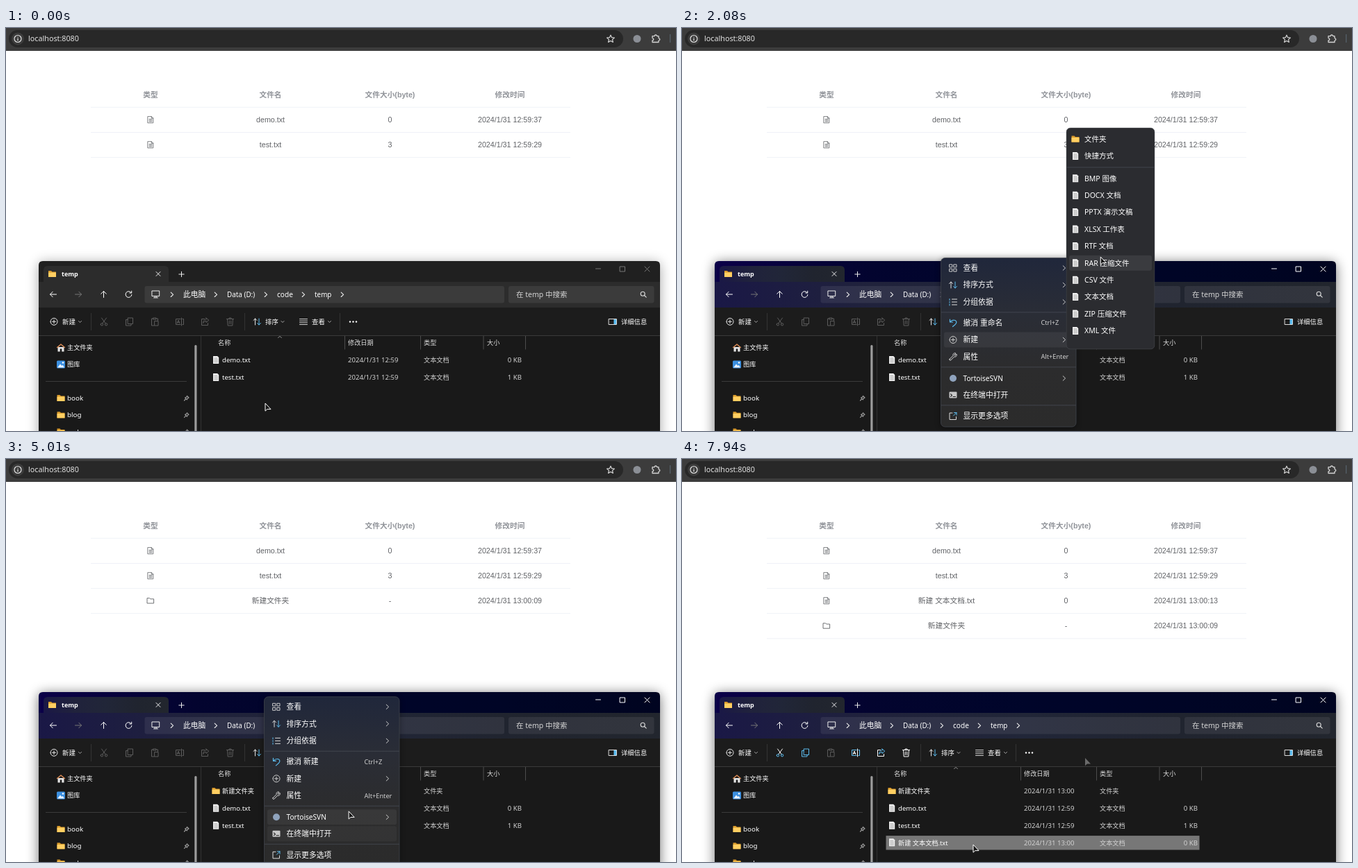
Recreate the animation shown at these times as an HTML page. Size 964 by 581 pixels, loop 8000 ms.

```html
<!DOCTYPE html>
<html lang="zh-CN">
<head>
<meta charset="utf-8">
<title>File list</title>
<style>
html,body{margin:0;width:100%;height:100%;overflow:hidden;background:#fff}
svg{display:block;width:964px;height:581px}
text{white-space:pre;font-family:"Noto Sans","Noto Sans CJK SC",sans-serif}
.web text{font-family:"Liberation Sans","Noto Sans CJK SC",sans-serif}
.tool{color:#fff;--a:#5cbdf0}
.tool.off{color:#5c5c5c;--a:#5c5c5c}
</style>
</head>
<body>
<svg id="stage" viewBox="0 0 964 581"></svg>
<script>
const LOOP = 8000;
const BLUE = '#5cbdf0';

// ---------- markup helpers ----------
const text = (x, y, s, size, fill = '#fff', anchor = 'start', weight = 400) =>
  `<text x="${x}" y="${y + size * .36}" font-size="${size}" fill="${fill}" text-anchor="${anchor}" font-weight="${weight}">${s}</text>`;
const rect = (x, y, w, h, fill, r = 0, more = '') =>
  `<rect x="${x}" y="${y}" width="${w}" height="${h}" rx="${r}" fill="${fill}" ${more}/>`;
const line = (x, y, d, color, w = 1) =>
  `<path transform="translate(${x} ${y})" d="${d}" fill="none" stroke="${color}" stroke-width="${w}" stroke-linecap="round" stroke-linejoin="round"/>`;
const solid = (x, y, d, fill) => `<path transform="translate(${x} ${y})" d="${d}" fill="${fill}"/>`;
const group = (id, body, more = '') => `<g id="${id}" ${more}>${body}</g>`;
const size = s => /[\u4e00-\u9fff]/.test(s) ? 9.2 : 9.6;
const label = (x, y, s, fill, anchor) => text(x, y, s, size(s), fill, anchor);

const RIGHT = 'M-1.8-3.2L1.6 0L-1.8 3.2';
const DOWN = 'M-2-1L0 1L2-1';
const RING = 'M-5 0a5 5 0 1 0 10 0a5 5 0 1 0-10 0';
const PLUS = 'M-2.5 0H2.5M0-2.5V2.5';

const folder = (x, y) =>
  solid(x, y, 'M-5.5-4.5H-1.5L0-3H5.5V4.5H-5.5Z', '#d99a2b') +
  solid(x, y, 'M-5.5-2H5.5V4.5H-5.5Z', '#ffcf62');
const sheet = (x, y) =>
  solid(x, y, 'M-4-5.5H2.2L4.2-3.5V5.5H-4Z', '#f1f1f1') +
  line(x, y, 'M-2.4-2.6H2M-2.4-.6H2.6M-2.4 1.4H2.6M-2.4 3.4H2.6', '#9a9a9a', .8);

// ---------- browser ----------
function browser() {
  return rect(0, 0, 964, 33, '#3c3c3c') + rect(4, 3, 884, 25, '#282828', 12.5) +
    `<circle cx="17" cy="15.5" r="9" fill="#3c3c3c"/>` +
    line(17, 15.5, RING, '#e3e3e3', 1.2) + line(17, 15.5, 'M0-.4V2.4M0-2.5V-2.4', '#e3e3e3', 1.2) +
    text(32, 15.5, 'localhost:8080', 10.75, '#e3e3e3') +
    line(870, 15.5, 'M0-5.3L1.6-1.8L5.4-1.4L2.5 1.1L3.4 4.9L0 2.9L-3.4 4.9L-2.5 1.1L-5.4-1.4L-1.6-1.8Z', '#d5d5d5', 1.2) +
    `<circle cx="908" cy="15.5" r="5.5" fill="#8b8f96"/>` +
    line(935, 15.5, 'M-5-3.8H-1.8a1.7 1.7 0 0 1 3.4 0H4V-.8a1.7 1.7 0 0 1 0 3.4V5H-5V2.5a1.7 1.7 0 0 0 0-3.4Z', '#d5d5d5', 1.3) +
    rect(955, 9, 1.2, 12, '#56616b');
}

// ---------- page table ----------
const COLS = [208, 380.5, 552.5, 725];
function webRow(id, y, name, bytes, time) {
  const icon = bytes === '-'
    ? line(208, y, 'M-4.6-3.7H-1.4L-.2-2.5H4.6V3.7H-4.6Z', '#606266', .9)
    : line(208, y, 'M-3.8-4.6H1.3L3.8-2.1V4.6H-3.8ZM1.3-4.6V-2.1H3.8M-2-.8H2M-2 .9H2M-2 2.6H2', '#606266', .8);
  return group(id, rect(122, y - 17.5, 690, 35.5, '#f9fafc', 0, `id="${id}Hover" visibility="hidden"`) + icon +
    [name, bytes, time].map((s, i) => text(COLS[i + 1], y, s, 10.7, '#606266', 'middle')).join('') +
    rect(122, y + 18, 690, .8, '#ebeef5'));
}
function table() {
  return ['类型', '文件名', '文件大小(byte)', '修改时间'].map((s, i) =>
    text(COLS[i], 96, s, 10.7, '#909399', 'middle', 700)).join('') + rect(122, 113.8, 690, .8, '#ebeef5') +
    webRow('w1', 132.2, 'demo.txt', '0', '2024/1/31 12:59:37') +
    webRow('w2', 168.3, 'test.txt', '3', '2024/1/31 12:59:29') +
    webRow('w3', 204.3, '新建 文本文档.txt', '0', '2024/1/31 13:00:13') +
    webRow('w4', 204.3, '新建文件夹', '-', '2024/1/31 13:00:09');
}

// ---------- explorer ----------
const C = 'currentColor', A = 'var(--a)';
const TOOLS = {
  cut: line(141, 423.5, 'M-3.5-5.5L2.2 2.2M3.5-5.5L-2.2 2.2', C) +
    line(141, 423.5, 'M-4.8 3.8a1.7 1.7 0 1 0 3.4 0a1.7 1.7 0 1 0-3.4 0M1.4 3.8a1.7 1.7 0 1 0 3.4 0a1.7 1.7 0 1 0-3.4 0', A),
  copy: line(177.5, 423.5, 'M-2-5.5H5V3H-2ZM-2-3H-5V5.5H2.5V3', A),
  paste: line(214, 423.5, 'M-2-4.5H-4.5V5.5H-1M2-4.5H4.5V-2M-2-5.5H2V-3.5H-2ZM0-1H5V5.5H0Z', C),
  rename: line(250, 423.5, 'M1-4H-5.5V4H1M4-4H5.5V4H4', A) +
    line(250, 423.5, 'M2.5-5.5V5.5M-3.8 2.2L-2-2.4L-.2 2.2M-3.2.8H-.8', C),
  share: line(286.5, 423.5, 'M-1-4H-5V5H4V2', C) + line(286.5, 423.5, 'M1.5-5.5L5.3-2.3L1.5 1V-1C-1-1-2 .5-2.8 2C-2.5-2-.5-3.5 1.5-3.7Z', A),
  trash: line(322.5, 423.5, 'M-5-4H5M-1.5-4V-5.5H1.5V-4M-4-4L-3.3 5.5H3.3L4-4M-1.2-1.5V3M1.2-1.5V3', C)
};
function explorerRow(id, y, icon, name, date, type, kb) {
  return group(id, rect(293.5, y - 10.2, 451, 20.4, 'none', 0, `id="${id}Box"`) + icon(302, y - .5) +
    label(311, y, name) + label(492, y, date, '#d2d2d2') + label(601, y, type, '#d2d2d2') + label(742, y, kb, '#d2d2d2', 'end'));
}
function editBox(id, y, w, sel, head, tail) {
  return group(id, rect(309.5, y - 7, w, 14.5, '#191919', 0, 'stroke="#e8e8e8" stroke-width="1"') +
    rect(311, y - 5.8, sel, 12, '#0f78d4') + label(311, y, head) + (tail ? text(311 + sel, y, tail, 9.2) : ''));
}
function windowFrame() {
  const tab = 'M54 366V349q0-6 6-6H228q6 0 6 6V366Z';
  const top = 'M47 366V342q0-6 6-6H935q6 0 6 6V366Z';
  const skin = (bar, band) => `<path d="${top}" fill="${bar}"/>` + rect(47, 366, 894, 37, band) + `<path d="${tab}" fill="${band}"/>`;
  const controls = color => line(852, 347, 'M-3.5 0H3.5', color) + line(887, 347.5, 'M-3.5-3.5H3.5V3.5H-3.5Z', color) +
    line(922.5, 347.5, 'M-3.5-3.5L3.5 3.5M3.5-3.5L-3.5 3.5', color);
  return rect(47, 338, 894, 260, '#000', 6, 'id="shadow" filter="url(#blur)"') +
    rect(47, 342, 894, 245, '#191919') +
    group('idle', skin('#202020', '#2c2c2c') + controls('#777')) +
    group('live', skin('url(#bar)', 'url(#band)') + controls('#fff')) +
    rect(199.5, 372, 517.5, 24.5, '#fff', 3, 'opacity=".07"') + rect(723, 372, 209.5, 24.5, '#fff', 3, 'opacity=".07"') +
    folder(66.5, 354.5) + text(80, 354.5, 'temp', 9, '#fff', 'start', 600) +
    line(219, 354.5, 'M-3-3L3 3M3-3L-3 3', '#eee') + line(252.5, 355, 'M-3.7 0H3.7M0-3.7V3.7', '#eee');
}
function navigation() {
  return line(68, 384, 'M4.5 0H-4.5M-.8-3.8L-4.5 0L-.8 3.8', '#fff') + line(104, 384, 'M-4.5 0H4.5M.8-3.8L4.5 0L.8 3.8', '#777') +
    line(140.5, 384, 'M0 4.5V-4.5M-3.8-.8L0-4.5L3.8-.8', '#fff') +
    line(176.5, 384, 'M3.8-2.2A4.4 4.4 0 1 0 4.4.5M4.2-4.8V-2H1.4', '#fff') +
    line(215.5, 383.5, 'M-5.2-4.5H5.2V3H-5.2ZM-1.2 3V5.2M1.2 3V5.2M-3 5.4H3', '#eee') +
    [239, 302, 374, 428, 484].map(x => line(x, 384.3, RIGHT, '#eee', 1.1)).join('') +
    text(255, 384, '此电脑', 10.8) + text(318, 384, 'Data (D:)', 9.9) + text(390, 384, 'code', 10.1) + text(444, 384.3, 'temp', 9.9) +
    text(734, 384.3, '在 temp 中搜索', 10.5, '#d4d4d4') +
    line(917, 384, 'M-3.8-.8a3 3 0 1 0 6 0a3 3 0 1 0-6 0M1.5 1.5L4.2 4.2', '#ddd', 1.1);
}
function commands() {
  return rect(47, 403, 894, 40, '#1c1c1c') + rect(47, 443, 894, 1, '#3a3a3a') +
    [122, 343, 480].map(x => rect(x, 411, .8, 25, '#3a3a3a')).join('') +
    line(69, 423.3, RING + PLUS, '#e8e8e8') + text(81, 423.5, '新建', 9.5) + line(106.5, 423.5, DOWN, '#aaa') +
    Object.keys(TOOLS).map(k => group(k, TOOLS[k], 'class="tool off"')).join('') +
    line(361, 423.5, 'M-2.5 4.5V-4.5M-5-2L-2.5-4.5L0-2', '#e8e8e8') + line(361, 423.5, 'M3-4.5V4.5M.5 2L3 4.5L5.5 2', BLUE) +
    text(373, 423.5, '排序', 9.4) + line(398, 423.5, DOWN, '#aaa') +
    line(428, 423.5, 'M-5.5-4H5.5M-5.5-1.3H5.5M-5.5 1.3H5.5M-5.5 4H5.5', '#ddd', .9) +
    text(440, 423.5, '查看', 9.4) + line(465.5, 423.5, DOWN, '#aaa') +
    [495, 499.5, 504].map(x => `<circle cx="${x}" cy="423.5" r="1.2" fill="#fff"/>`).join('') +
    line(873, 423.5, 'M-5.5-4H5.5V4H-5.5Z', '#ddd') + rect(874.5, 420, 3.6, 7, BLUE) + text(885, 423.5, '详细信息', 9.3);
}
function sidebar() {
  const pin = y => line(260, y, 'M-3.5 3.5L-1 1M.5-3L3 -.5L1.2.4L.4 2.4L-2.4-.4L-.4-1.2Z', '#9a9a9a', 1.2);
  return solid(79, 461, 'M-4.5-1H4.5V5.5H1.3V1.5H-1.3V5.5H-4.5Z', '#e5e5e5') +
    line(79, 461, 'M-5.3-.5L0-5L5.3-.5', '#d98a54', 1.6) + label(88, 461, '主文件夹') +
    rect(73, 479.5, 12, 11, '#3b8fe0', 1.5) + solid(79, 485, 'M-5 4.5L-1-.5L1.3 2L2.6 .8L5 4.5Z', '#e9f4ff') +
    `<circle cx="82" cy="482.5" r="1.2" fill="#fff"/>` + label(88, 485, '图库') + rect(57, 509, 203, 1, '#3a3a3a') +
    ['book', 'blog', 'code'].map((s, i) => folder(79, 533.5 + i * 24.3) + text(88, 533.5 + i * 24.3, s, 9.8) + pin(533.5 + i * 24.3)).join('') +
    rect(271.3, 457, 3.2, 130, '#9c9c9c', 1.5) + rect(280, 444, 1, 140, '#333');
}
function files() {
  return [[305, '名称'], [492, '修改日期'], [601, '类型'], [692, '大小']].map(([x, s]) => label(x, 454, s, '#dcdcdc')).join('') +
    [487, 596, 686.5, 747].map(x => rect(x, 444, 1, 19.5, '#4c4c4c')).join('') + line(394, 445.5, 'M-2.5 1L0-1L2.5 1', '#999', .9) +
    explorerRow('dir', 479, folder, '新建文件夹', '2024/1/31 13:00', '文件夹', '') +
    group('old', explorerRow('demo', 479, sheet, 'demo.txt', '2024/1/31 12:59', '文本文档', '0 KB') +
      explorerRow('test', 504, sheet, 'test.txt', '2024/1/31 12:59', '文本文档', '1 KB')) +
    explorerRow('doc', 553.3, sheet, '新建 文本文档.txt', '2024/1/31 13:00', '文本文档', '0 KB') +
    editBox('editDir', 479, 59, 46, '新建文件夹') + editBox('editDoc', 553.3, 87, 57.6, '新建 文本文档', '.txt');
}

// ---------- menus ----------
const ITEMS = [
  [346, '查看', '>', line(0, 0, 'M-5-5H-1.2V-1.2H-5ZM1.2-5H5V-1.2H1.2ZM-5 1.2H-1.2V5H-5ZM1.2 1.2H5V5H1.2Z', '#ccc')],
  [370.5, '排序方式', '>', line(0, 0, 'M-3 4.5V-4.5M-5.5-2L-3-4.5L-.5-2', '#ddd') + line(0, 0, 'M3-4.5V4.5M.5 2L3 4.5L5.5 2', BLUE)],
  [395, '分组依据', '>', line(0, 0, 'M-1.5-4H5.5M-1.5 0H5.5M-1.5 4H5.5', '#ddd') + line(0, 0, 'M-5-4.5V-2.5M-5-.5V1M-5 3V5', BLUE)],
  [425, '', 'Ctrl+Z', line(0, 0, 'M-4.5-5V-1H-.5M-4.3-1.2C-1-5 5-4.5 4.8-.5C4.5 2 2 3.5-.5 5.5', BLUE, 1.2)],
  [449.5, '新建', '>', line(0, 0, RING + PLUS, '#ccc')],
  [474, '属性', 'Alt+Enter', line(0, 0, 'M-5 3.4L.2-1.8C-.8-4.5 2-6 4-5L1.8-2.8L2.8-1.8L5-4C6-2 4.5.8 1.8-.2L-3.4 5C-4.6 5.6-5.6 4.6-5 3.4Z', '#ddd')],
  [505, 'TortoiseSVN', '>', '<circle r="5" fill="#8fa3bd"/>'],
  [529, '在终端中打开', '', rect(-5.5, -4.5, 11, 9, '#c8c8c8', 1) + line(0, .5, 'M-3.5-1.8L-1.5 0L-3.5 1.8M0 2H3.5', '#222', 1.1)],
  [559.5, '显示更多选项', '', line(0, 0, 'M-1-4.5H-5V5H4.5V1', '#ddd') + line(0, 0, 'M1.5-5H5V-1.5M5-5L.5-.5', BLUE)]
];
const SUB = ['文件夹', '快捷方式', 'BMP 图像', 'DOCX 文档', 'PPTX 演示文稿', 'XLSX 工作表', 'RTF 文档', 'RAR 压缩文件', 'CSV 文件', '文本文档', 'ZIP 压缩文件', 'XML 文件'];
const subY = i => 160 + i * 24.4 + (i > 1 ? 8 : 0);

function menu() {
  const rows = ITEMS.map(([y, s, hint, icon], i) =>
    rect(377, y - 11, 186, 22, '#fff', 3, `id="m${i}" opacity="0"`) +
    group('r' + i, `<g transform="translate(390 ${y})">${icon}</g>` +
      (i === 3 ? text(404.5, y, '撤消 重命名', 10.8).replace('<text', '<text id="undo"') : text(404.5, y, s, i === 6 ? 10.1 : 10.8)) +
      (hint === '>' ? line(550, y, RIGHT, '#ccc') : text(516.5, y, hint, 9.2, '#cfcfcf')))).join('');
  return rect(372, 333, 195, 244, '#000', 6, 'filter="url(#soft)" opacity=".4"') +
    rect(372.5, 331.5, 194.5, 243.5, 'url(#menuFill)', 6, 'stroke="#41444c" stroke-width=".8"') +
    [410, 489, 544].map(y => rect(373, y - .5, 194, .8, '#474b54')).join('') + rows;
}
function submenu() {
  const icon = (i, y) => i ? sheet(566, y) : folder(566, y);
  return rect(553, 144, 127, 319, '#2b2c30', 6, 'stroke="#45474d" stroke-width=".8"') + rect(553.5, 200.5, 126, .8, '#474b54') +
    SUB.map((s, i) => rect(557, subY(i) - 11, 119, 22, '#fff', 3, `id="s${i}" opacity="0"`) + icon(i, subY(i)) + text(579, subY(i), s, 10.5)).join('');
}

// ---------- stage ----------
const ramp = (id, stops, dir = 'x2="1"') => `<linearGradient id="${id}" ${dir}>` +
  stops.map((c, i) => `<stop offset="${i / (stops.length - 1)}" stop-color="${c}"/>`).join('') + '</linearGradient>';
const blur = (id, d) => `<filter id="${id}" x="-10%" y="-20%" width="120%" height="140%"><feGaussianBlur stdDeviation="${d}"/></filter>`;
const ARROW = 'M0 0V11.2L2.9 8.6H8Z';

document.getElementById('stage').innerHTML =
  '<defs>' + ramp('bar', ['#0b0048', '#03042f', '#00052a', '#000526', '#000420']) +
  ramp('band', ['#1a1846', '#20223c', '#212638', '#20242f', '#22262e']) +
  ramp('menuFill', ['#20273b', '#2a2d36', '#2c2c2d', '#2b2b2b'], 'x2="0" y2="1"') + blur('blur', 9) + blur('soft', 4) + '</defs>' +
  rect(0, 0, 964, 581, '#fff') + browser() + `<g class="web">${table()}</g>` +
  windowFrame() + navigation() + commands() + sidebar() + files() +
  group('trailA', solid(552.5, 360, 'M-3.5-2L0-5.5L3.5-2ZM-3.5 2L0 5.5L3.5 2Z', '#454a58')) +
  group('trailB', solid(580, 431, ARROW, '#6b6b6b')) +
  group('menu', menu()) + group('sub', submenu()) +
  `<path id="cursor" d="${ARROW}" stroke="#fff" stroke-width="1" stroke-linejoin="round"/>`;

const el = {};
document.querySelectorAll('[id]').forEach(e => el[e.id] = e);
const show = (id, on) => el[id].setAttribute('display', on ? 'inline' : 'none');
const set = (id, name, v) => el[id].setAttribute(name, v);
const within = (t, a, b) => t >= a && t < b;

// ---------- motion ----------
const PATH = [
  [0, 373, 541], [550, 373, 541], [870, 392, 518], [1250, 465, 488], [1560, 520, 453], [1700, 520, 453],
  [1980, 585, 400], [2350, 630, 152], [2800, 630, 152], [3000, 552, 355], [3340, 360, 558], [3600, 360, 558],
  [3950, 371, 552], [4660, 371, 552], [4860, 452, 534], [5010, 493, 508], [5400, 520, 458], [5560, 520, 458],
  [5850, 590, 445], [6340, 645, 388], [7150, 645, 388], [7280, 580, 431], [7540, 419, 556], [8000, 419, 556]
];
// Tangent is zero wherever the pointer rests.
function slope(i, k) {
  const p = PATH[i - 1], q = PATH[i], n = PATH[i + 1];
  if (!p || !n || (p[1] === q[1] && p[2] === q[2]) || (n[1] === q[1] && n[2] === q[2])) return 0;
  return (n[k] - p[k]) / (n[0] - p[0]);
}
function pointer(t) {
  let i = 0;
  while (i < PATH.length - 2 && t >= PATH[i + 1][0]) i++;
  const a = PATH[i], b = PATH[i + 1], d = b[0] - a[0];
  const u = Math.max(0, (t - a[0]) / d), u2 = u * u, u3 = u2 * u;
  return [1, 2].map(k => (2 * u3 - 3 * u2 + 1) * a[k] + (u3 - 2 * u2 + u) * d * slope(i, k) +
    (3 * u2 - 2 * u3) * b[k] + (u3 - u2) * d * slope(i + 1, k));
}

function draw(t) {
  const [x, y] = pointer(t), past = pointer(t - 120);
  const second = t > 4000;
  const dx = second ? -1 : 0, dy = second ? 11.3 : 0;
  const menuAt = second ? 4400 : 330, subAt = second ? 5540 : 1670;
  const open = within(t, 330, 2540) || within(t, 4400, 6400);
  const subOpen = open && t >= subAt;

  const active = t >= 130;
  show('idle', !active);
  show('live', active);
  set('shadow', 'opacity', active ? .55 : .35);

  // page rows
  show('w4', t >= 2610);
  show('w3', t >= 6540);
  set('w4', 'transform', `translate(0 ${t >= 6540 ? 36.2 : 0})`);
  set('w1Hover', 'visibility', within(t, 2550, 2860) ? 'visible' : 'hidden');

  // file list
  const hasDir = t >= 3080, hasDoc = t >= 7080;
  const dirPicked = within(t, 3080, 3740), docPicked = hasDoc;
  show('dir', hasDir);
  show('doc', hasDoc);
  set('old', 'transform', `translate(0 ${hasDir ? 24.8 : 0})`);
  const box = (id, fill, edge) => { set(id + 'Box', 'fill', fill); set(id + 'Box', 'stroke', edge); };
  const dirFocus = within(t, 3740, 4180) || within(t, 6410, 7080);
  box('dir', dirPicked ? '#636363' : 'none', dirFocus ? '#858585' : 'none');
  box('test', 'none', within(t, 2550, 3080) ? '#858585' : 'none');
  box('doc', t >= 7480 ? '#777' : '#636363', 'none');
  show('editDir', within(t, 3080, 3540));
  show('editDoc', within(t, 7080, 7680));
  for (const k in TOOLS) {
    const on = k !== 'paste' && (docPicked || (dirPicked && k !== 'share'));
    el[k].setAttribute('class', on ? 'tool' : 'tool off');
  }
  show('trailA', within(t, 3040, 4400));
  show('trailB', t >= 7340);

  // menus
  show('menu', open);
  show('sub', subOpen);
  if (open) {
    set('menu', 'transform', `translate(${dx} ${dy})`);
    set('menu', 'opacity', Math.min(1, .4 + (t - menuAt) / 110));
    el.undo.textContent = second ? '撤消 新建' : '撤消 重命名';
    const over = ([px, py], cy, x0, x1) => px > x0 && px < x1 && Math.abs(py - dy - cy) < 12.2;
    ITEMS.forEach(([cy], i) => {
      const lit = subOpen ? i === 4 : over([x, y], cy, 373, 566);
      const fading = !subOpen && over(past, cy, 373, 566);
      set('m' + i, 'opacity', lit ? .06 : fading ? .04 : 0);
    });
    set('r4', 'opacity', within(t, subAt - 90, subAt + 60) ? .72 : 1);
    SUB.forEach((_, i) => set('s' + i, 'opacity', over([x, y], subY(i), 553, 680) ? .07 : 0));
    const u = Math.min(1, Math.max(0, (t - subAt) / 130));
    set('sub', 'transform', `translate(${dx} ${dy})`);
    el.sub.style.clipPath = `inset(${25 * (1 - u) ** 2}% 0 0 0)`;
  }

  set('cursor', 'transform', `translate(${x} ${y})`);
  set('cursor', 'fill', !open && y < 336 ? '#bbb' : '#161616');
}

function tick() {
  draw(performance.now() % LOOP);
  requestAnimationFrame(tick);
}
tick();
</script>
</body>
</html>
```
